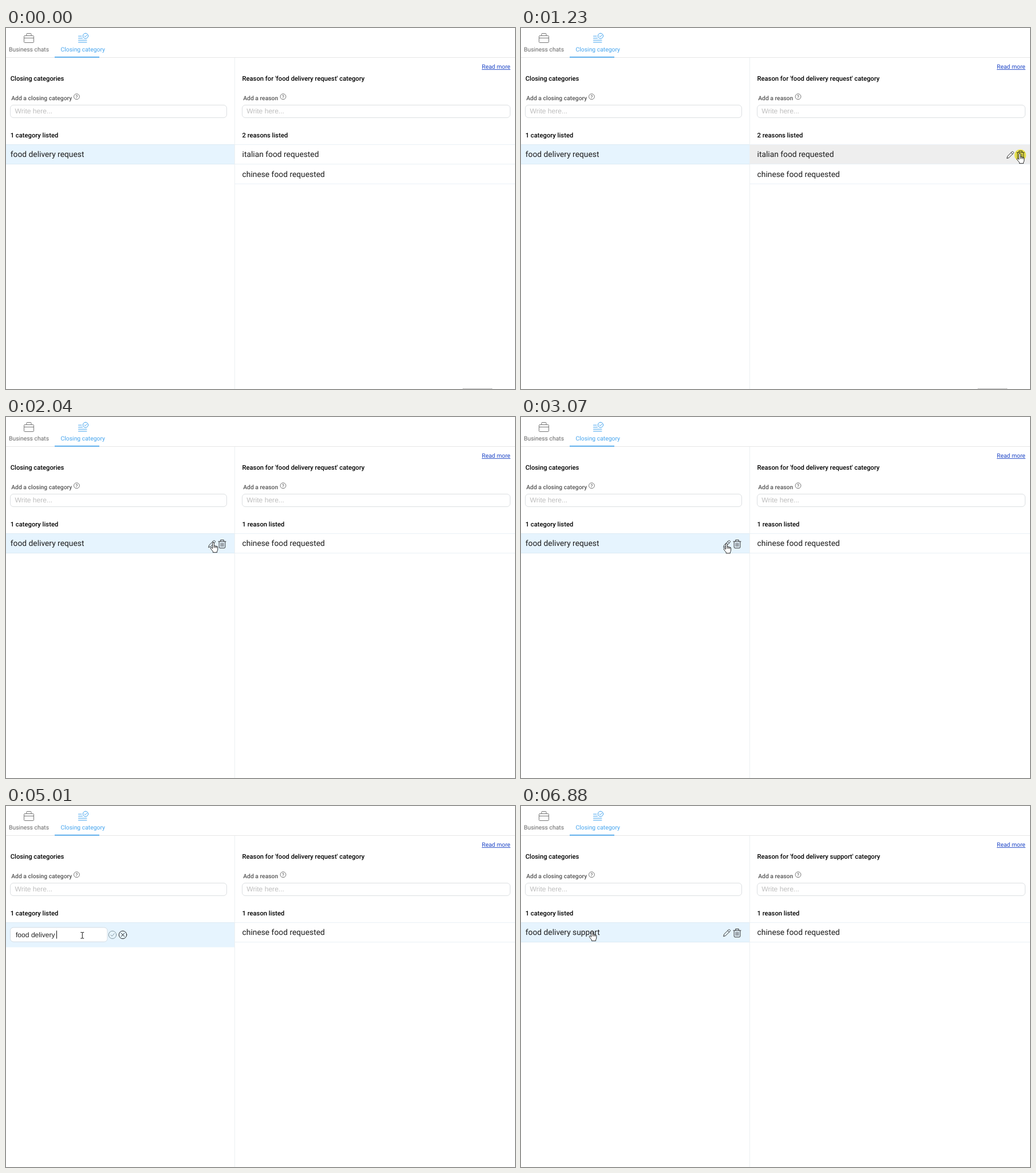
Write an HTML page that moves like this. It is 889 px wide and 630 px high and loops after 6.95 s.

```html
<!DOCTYPE html>
<html lang="en">
<head>
<meta charset="utf-8">
<title>Closing categories</title>
<style>
  html, body { margin: 0; width: 100%; height: 100%; overflow: hidden; background: #fff; }
  svg { display: block; width: 889px; height: 630px; }
  text { font-family: Roboto, sans-serif; white-space: pre; text-rendering: geometricPrecision; }
  .tab { font-size: 10.37px; fill: #666; }
  .head { font-size: 11.23px; font-weight: 500; fill: #000; }
  .label { font-size: 10.37px; font-weight: 500; fill: #555; }
  .row { font-size: 13.82px; fill: #1c1c1c; }
  .field { font-family: "Liberation Sans", Arial, sans-serif; font-size: 12.1px; fill: #222; }
  .hint { fill: #bdbdbd; }
  .line { fill: none; stroke-linecap: round; stroke-linejoin: round; }
  .box { fill: #fff; stroke: #dcdfe2; }
  .rule { stroke: #e9f0f6; }
</style>
</head>
<body>
<svg viewBox="0 0 889 630">
  <defs>
    <g id="help">
      <circle r="4.9" fill="none" stroke="#666" stroke-width=".9"/>
      <text y="2.8" text-anchor="middle" font-size="8" fill="#444">?</text>
    </g>
    <g id="tools" class="line" stroke="#333">
      <path d="M353.8 227.2 L354.8 223.6 L362.6 215.9 Q363.6 215.1 364.5 215.9 L365.2 216.7 Q366 217.6 365.2 218.5 L357.4 226.2 Z M361 217.5 L363.7 220.1"/>
      <path d="M371 217.2 H384 M374.7 217 V214.6 H380.3 V217 M372.2 217.5 V227 Q372.2 228.8 374 228.8 H381 Q382.8 228.8 382.8 227 V217.5"/>
      <path d="M375.2 220 V226 M377.5 220 V226 M379.8 220 V226" stroke-width=".9"/>
    </g>
  </defs>

  <!-- tabs -->
  <g class="line" stroke="#777">
    <rect x="31.5" y="13.5" width="17" height="12" rx="1"/>
    <path d="M36 13 V10.5 Q36 9.5 37 9.5 H43 Q44 9.5 44 10.5 V13 M31.5 17.5 H48.5"/>
  </g>
  <text class="tab" x="5" y="41.4">Business chats</text>
  <g class="line" stroke="#42a3ee">
    <path d="M126.5 14.2 H132 M126.5 17.8 H133.5 M126.5 21.3 H141 M126.5 24.8 H141"/>
    <circle cx="139" cy="13.8" r="4.6"/>
    <path d="M136.8 13.9 L138.5 15.5 L141.4 12.2"/>
  </g>
  <text class="tab" x="95.6" y="41.4" style="fill:#42a3ee">Closing category</text>
  <path d="M0 51.5 H889" stroke="#e6e6e6"/>
  <rect x="85" y="50" width="78" height="1.6" fill="#42a3ee"/>
  <path d="M399.5 52 V630" stroke="#eceff1"/>

  <!-- left pane -->
  <text class="head" x="7.7" y="91.5">Closing categories</text>
  <text class="label" x="9.2" y="126">Add a closing category</text>
  <use href="#help" x="123.4" y="119.8"/>
  <rect class="box" x="7.5" y="134.5" width="378" height="22" rx="5.5"/>
  <text class="field hint" x="15.5" y="149.3">Write here...</text>
  <text class="head" x="7.7" y="190.8">1 category listed</text>
  <rect id="leftRow" y="203.5" width="399" height="34.5" fill="#e6f4fe"/>
  <path d="M0 203.5 H399" stroke="#dcebf5"/>
  <path id="leftRule" d="M0 237.5 H399" stroke="#dcebf5"/>
  <text class="row" id="category" x="7.8" y="225"></text>
  <use href="#tools" id="leftTools"/>
  <g id="editor">
    <rect class="box" x="7.5" y="212" width="169.5" height="25" rx="5.5" style="stroke:#d3dce3"/>
    <text class="field" id="entry" x="17" y="228.6"></text>
    <rect id="caret" y="217.5" width="1" height="14" fill="#111"/>
    <g class="line">
      <g stroke="#83979e">
        <circle cx="186" cy="224.8" r="6.7"/>
        <path d="M182.9 225 L185.2 227.1 L189.2 222.6"/>
      </g>
      <g stroke="#222">
        <circle cx="204" cy="224.8" r="6.8"/>
        <path d="M201.2 222 L206.8 227.6 M206.8 222 L201.2 227.6"/>
      </g>
    </g>
  </g>

  <!-- right pane -->
  <text x="831" y="71" font-size="10.37" fill="#1d45c6">Read more</text>
  <path d="M831 72.5 H881" stroke="#1d45c6" stroke-width=".9"/>
  <text class="head" id="reasonHead" x="412.5" y="91.5"></text>
  <text class="label" x="414.2" y="126">Add a reason</text>
  <use href="#help" x="484" y="119.8"/>
  <rect class="box" x="412.5" y="134.5" width="468" height="22" rx="5.5"/>
  <text class="field hint" x="420.3" y="149.3">Write here...</text>
  <text class="head" id="count" x="412.5" y="190.8"></text>
  <rect id="hover" x="400" width="489" height="34" fill="#eee"/>
  <path class="rule" d="M400 203.5 H889 M400 237.5 H889"/>
  <path class="rule" id="secondRule" d="M400 272 H889"/>
  <text class="row" id="first" x="412.6" y="225"></text>
  <text class="row" id="second" x="412.6" y="259.8">chinese food requested</text>
  <use href="#tools" id="rightTools"/>
  <path id="dots" d="M798 629.5 H850" stroke="#777" stroke-dasharray="1 1"/>

  <!-- pointer -->
  <circle id="glow" r="10.3" fill="#f7ee1c" opacity=".75" style="mix-blend-mode:multiply"/>
  <path id="arrow" d="M0 0 V11.2 L2.6 8.8 L4.4 12.8 L6.2 12 L4.5 8.2 H8.2 Z" fill="#fff" stroke="#111" stroke-width=".8"/>
  <path id="hand" class="line" style="fill:#fff" stroke="#111" stroke-width=".9" d="M-1.4 10.2 V1.3 Q-1.4 0 0 0 Q1.4 0 1.4 1.3 V6 Q2.6 5.2 3.7 6.3 Q4.9 5.7 5.8 6.9 Q7.8 6.6 7.8 8.4 V12 Q7.8 14 6.6 15.3 V17.3 H-.6 V15.4 Q-3 13 -4.6 10.3 Q-5 8.5 -3.4 8.6 Q-2.2 9 -1.4 10.2 M1.4 6 V9 M3.7 6.5 V9 M5.8 7 V9.2"/>
  <path id="beam" class="line" stroke="#111" d="M-2.5 -5 H-.8 L0 -4.4 L.8 -5 H2.5 M0 -4.4 V4.9 M-2.5 5.5 H-.8 L0 4.9 L.8 5.5 H2.5"/>
</svg>
<script>
  const LOOP = 6950;
  const OLD = 'food delivery request', NEW = 'food delivery support';
  const REMOVED = 1330, OPENED = 3210, SAVED = 6720;

  // time, pointer shape, x, y
  const pointer = [
    [0, '', 0, 0], [280, 'arrow', 704, 353], [380, 'arrow', 685.5, 295.5],
    [610, 'hand', 735, 250], [680, 'hand', 792, 230], [750, 'hand', 836, 222],
    [900, 'hand', 855, 221], [1000, 'hand', 863, 220], [1070, 'hand', 868, 219], [1150, 'hand', 871, 219],
    [1490, 'arrow', 602, 171.5], [1580, 'arrow', 395.5, 195.5],
    [1800, 'hand', 381, 213], [1870, 'hand', 374, 222], [1950, 'hand', 367, 225],
    [2040, 'hand', 362, 219], [2110, 'hand', 359.5, 213], [2190, 'hand', 358.6, 208.5],
    [2430, 'hand', 358.6, 223], [2900, 'hand', 358.6, 222], [2980, 'hand', 358.8, 221], [3070, 'hand', 358.8, 220.5],
    [3210, 'arrow', 358.5, 220.5], [3290, 'arrow', 262, 226], [3380, 'beam', 166, 226], [3460, 'beam', 133.3, 225.5],
    [6480, 'arrow', 183, 225], [6720, 'hand', 168, 222], [6800, 'hand', 144, 220], [6880, 'hand', 124, 218]
  ];
  const clicks = [[1230, 1330, 872, 222], [3690, 3750, 132.5, 225.3], [6640, 6720, 184, 225.3]];
  const erase = [3990, 4220, 4380, 4540, 4690, 4840, 5010];
  const type = [5390, 5640, 5870, 6040, 6210, 6370, 6430];

  const el = id => document.getElementById(id);
  const passed = (times, t) => times.filter(s => s <= t).length;
  const show = (id, on) => { el(id).style.display = on ? '' : 'none'; };
  const put = (id, x, y) => el(id).setAttribute('transform', `translate(${x} ${y})`);
  const write = (id, text) => { if (el(id).textContent !== text) el(id).textContent = text; };

  function drawLists(t) {
    const removed = t >= REMOVED, saved = t >= SAVED;
    const name = saved ? NEW : OLD;
    write('reasonHead', `Reason for '${name}' category`);
    write('count', removed ? '1 reason listed' : '2 reasons listed');
    write('first', removed ? 'chinese food requested' : 'italian food requested');
    write('category', name);
    for (const id of ['second', 'secondRule', 'dots']) show(id, !removed);

    const over = t >= 610 && t < 1490;
    const shift = t < 680 ? 34.5 : 0;
    show('hover', over);
    show('rightTools', over);
    el('hover').setAttribute('y', 204 + shift);
    put('rightTools', 495, shift);
  }

  function drawEditor(t) {
    const open = t >= OPENED && t < SAVED;
    show('editor', open);
    show('category', !open);
    show('leftRule', !open);
    show('leftTools', (t >= 1800 && t < OPENED) || t >= SAVED);
    el('leftRow').setAttribute('height', open ? 43 : 34.5);
    if (!open) return;
    const typed = passed(type, t);
    const stem = OLD.length - erase.length;
    write('entry', typed ? NEW.slice(0, stem + typed) : OLD.slice(0, OLD.length - passed(erase, t)));
    show('caret', t >= 3900);
    el('caret').setAttribute('x', Math.floor(17 + el('entry').getComputedTextLength()));
  }

  function drawPointer(t) {
    const [, shape, x, y] = pointer[passed(pointer.map(p => p[0]), t) - 1];
    for (const id of ['arrow', 'hand', 'beam']) show(id, id === shape);
    if (shape) put(shape, x, y);
    const click = clicks.find(([from, to]) => t >= from && t < to);
    show('glow', click);
    if (click) put('glow', click[2], click[3]);
  }

  const start = performance.now();
  function tick() {
    const t = (performance.now() - start) % LOOP;
    drawLists(t);
    drawEditor(t);
    drawPointer(t);
    requestAnimationFrame(tick);
  }
  tick();
</script>
</body>
</html>
```
